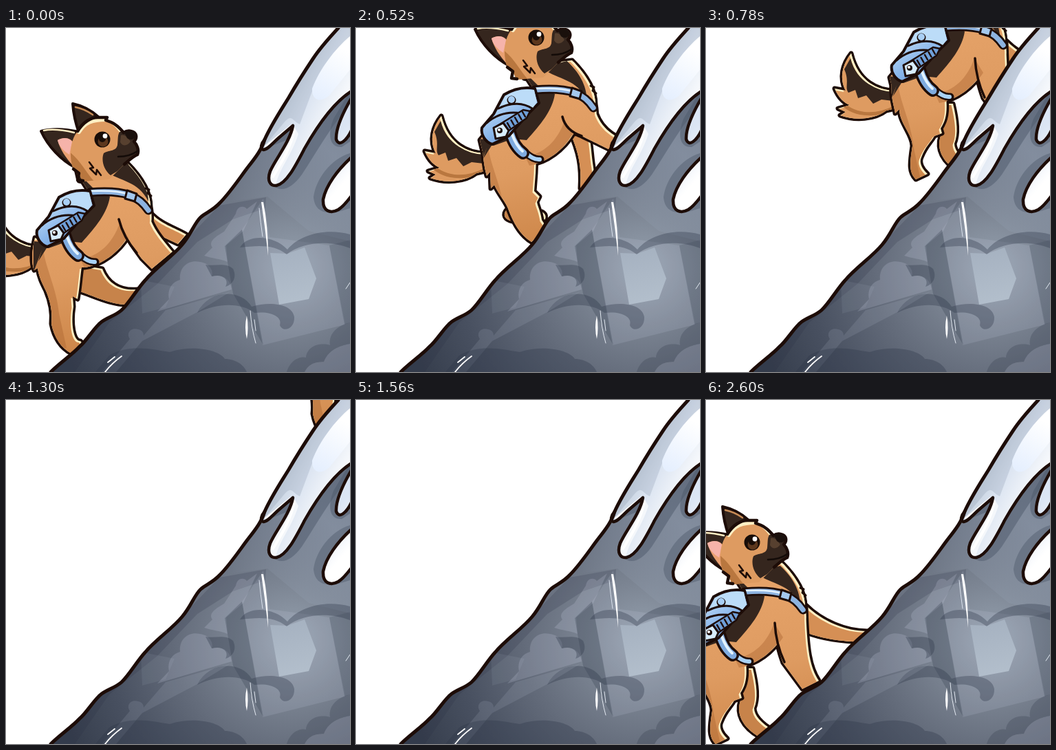
Write an HTML page with a canvas that moves like this. It is 500x500 px and loops after 2860 ms.

```html
<!DOCTYPE html>
<html lang="en">
<head>
<meta charset="utf-8">
<title>Climbing dog</title>
<style>
html, body { margin: 0; width: 100%; height: 100%; overflow: hidden; background: #fff; }
canvas { display: block; width: 500px; height: 500px; }
</style>
</head>
<body>
<canvas id="stage" width="500" height="500"></canvas>
<script>
const INK = '#1d0c07', CREAM = '#fff0c4', DARK = '#35261e', FUR = '#de9b61', SHADE = '#b9773f';
const STEP = 260, LOOP = 2860;
const stage = document.getElementById('stage').getContext('2d');
let ctx = stage;

const P = d => new Path2D(d);

function fill(d, style) {
  ctx.fillStyle = style;
  ctx.fill(P(d));
}

function line(d, width = 4.5, style = INK) {
  ctx.lineWidth = width;
  ctx.strokeStyle = style;
  ctx.lineJoin = ctx.lineCap = 'round';
  ctx.stroke(P(d));
}

function shape(d, style, width = 4) {
  fill(d, style);
  line(d, width);
}

function dot(x, y, r, style) {
  ctx.fillStyle = style;
  ctx.beginPath();
  ctx.arc(x, y, r, 0, 7);
  ctx.fill();
}

function within(d, draw) {
  ctx.save();
  ctx.clip(P(d));
  draw();
  ctx.restore();
}

function shifted(x, y, draw) {
  ctx.save();
  ctx.translate(x, y);
  draw();
  ctx.restore();
}

function linear(x0, y0, x1, y1, ...colors) {
  const g = ctx.createLinearGradient(x0, y0, x1, y1);
  colors.forEach((c, i) => g.addColorStop(i / (colors.length - 1), c));
  return g;
}

// One silhouette from several overlapping parts, with a rim light at the upper right
function furry(parts, style, details) {
  const d = parts.join(' ');
  line(d, 7);
  fill(d, CREAM);
  within(d, () => {
    shifted(-2.5, 2, () => fill(d, style));
    if (details) details();
  });
}

const TORSO = 'M102 205L106 222L111 223L122 240C98 256 62 286 42 312L50 345L114 348C140 345 165 325 178 303L205 300C214 285 212 270 210 260C210 240 198 218 176 196Z';
const TAIL = 'M-14 277C-26 292 -32 312 -22 331L-38 328C-32 342 -24 349 -16 352L-33 357L-22 362L-30 367C-8 375 20 373 37 360L54 356L50 331C25 331 -4 318 -14 277Z';
const FACE = 'M104 150C112 137 124 129 135 130L147 130L145 134L153 137C160 140 166 146 171 152C177 148 187 149 189 156C190 160 188 163 186 165C190 169 194 177 191 184C184 187 178 193 172 198';
const HEAD = FACE + 'L150 220L111 223L106 211L98 205C92 190 92 165 104 150Z';

const poses = {
  stand: {
    tail: -13,
    hind: 'M42 305C36 330 38 345 41 352L46 349C48 362 52 370 58 382C64 396 68 412 66 430C70 450 80 465 95 473L115 462L108 455C98 455 94 430 98 405L97 390L104 394C108 372 108 355 112 335Z',
    farHind: 'M110 345L104 382C125 388 150 402 176 402L192 380C170 382 150 375 140 350Z',
    arm: 'M163 270C170 300 185 318 197 335L212 350L242 325C225 305 213 290 208 272Z',
    farArm: 'M200 275L216 298L250 314L262 300C245 290 225 285 210 268Z',
    crease: 'M164 278C169 298 178 313 190 327'
  },
  reach: {
    tail: 0,
    hind: 'M46 310C46 335 48 350 52 364L57 358L58 382L63 377C70 392 80 402 84 414C90 430 100 450 117 460L140 440L132 428C130 414 126 408 125 402L129 394L121 386L123 360L124 335Z',
    farHind: 'M82 412C74 420 78 428 90 430L128 432C140 430 140 420 132 416Z',
    arm: 'M163 268C165 290 178 302 190 306C205 313 222 322 252 336L264 318C232 305 215 292 208 262Z',
    farArm: 'M172 298C186 330 190 350 188 382L212 385L206 345C204 330 204 320 200 300Z',
    crease: 'M162 278C166 294 178 302 190 306'
  },
  stride: {
    tail: 0,
    hind: 'M46 310C42 340 48 350 50 364L56 358C56 378 76 396 75 412C71 438 70 450 80 460L97 452C90 446 84 436 88 428C94 412 102 406 107 397L118 393L116 386C124 374 126 362 124 340Z',
    farHind: 'M112 350L116 397C110 416 118 435 144 450L164 440C146 430 136 418 136 408C142 394 140 375 134 350Z',
    arm: 'M165 275C167 310 173 328 178 342L206 380L230 368C217 348 213 325 211 262Z',
    farArm: 'M205 265L212 298C235 307 260 311 298 312L300 296C270 296 235 282 211 258Z',
    crease: 'M166 284C167 305 173 326 180 341'
  }
};

// Per step: body x, body y, head x, head y, pose; empty steps show the bare slope
const steps = [
  [0, 0, 0, 0, 'stand'],
  [68, -75, -8, 0, 'stride'],
  [138, -149, -16, 1, 'reach'],
  [225, -240, -8, 3, 'stride'],
  [309, -335, -7, 5, 'stride'],
  [380, -410, 0, 0, 'stand'],
  null, null, null,
  [-135, 110, -14, -1, 'reach'],
  [-66, 40, -7, 5, 'stride']
];

function drawPack() {
  const blue = linear(60, 250, 110, 320, '#c5e0f8', '#8ab6ea', '#5f8fcf');
  const strap = 'M122 239C145 237 165 238 180 243C193 248 201 256 207 265';
  line(strap, 13);
  line(strap, 7.5, '#8db3e0');
  line('M125 237C148 236 165 237 179 242', 2.5, '#e3f2ff');
  shape('M176 236L190 241L187 252L173 248Z', '#a4c8ee', 3);
  line('M108 330Q120 341 130 340', 11);
  line('M108 330Q120 341 129 340', 6, '#a9d2f6');
  line('M86 301Q92 322 105 331', 18);
  line('M86 301Q92 322 105 331', 11, '#7fabdf');
  line('M89 304Q95 320 104 328', 4, '#e3f3ff');
  shape('M122 237C106 234 90 238 77 246L62 274L45 294C43 304 50 315 60 318L84 306L112 274L128 258Z', blue);
  fill('M121 239C106 237 93 240 80 248L69 268C88 257 106 258 119 265L125 257Z', '#bcdcf8');
  line('M69 266C88 256 106 258 118 266', 3);
  line('M52 287C66 275 84 270 102 273', 3);
  shape('M66 292L105 268L115 270L110 280L80 301Z', '#6f9fd8', 2.5);
  for (let i = 0; i < 5; i++) line(`M${82 + i * 5.5} ${287 - i * 4}l4 7`, 2.5);
  shape('M62 294L76 287L84 298L80 307L65 310Z', '#d7ecfd', 3);
  dot(71, 298, 4, INK);
  dot(70, 297, 2, '#fff');
  dot(88, 254, 6.5, INK);
  dot(88, 253, 5, '#a9cff5');
}

function drawHead() {
  shape('M51 150C70 145 88 147 106 151L101 203C80 192 61 172 51 150Z', DARK);
  line('M55 149C70 146 86 149 99 152', 2.5, CREAM);
  fill('M75 163C86 157 94 161 99 167L97 200C88 190 78 176 75 163Z', '#e9a071');
  fill('M75 163C86 157 94 161 96 166L92 184C84 179 77 172 75 163Z', '#f6b3aa');
  shape('M106 152C101 138 98 124 97 110C111 113 123 119 134 129L128 140Z', DARK);
  line('M101 115C111 117 119 121 126 126', 2.5, '#c78b55');
  fill(HEAD, FUR);
  within(HEAD, () => {
    line('M106 151C114 138 124 132 150 133C160 140 166 147 170 154', 6, CREAM);
    fill('M92 180C108 192 116 210 130 225L96 225Z', SHADE);
    fill('M165 151C172 148 180 154 195 156L195 186L172 202L152 214C142 206 138 192 142 182C149 177 160 180 162 170C163 162 162 156 165 151Z', DARK);
    fill('M167 156C173 154 177 160 181 165C177 171 170 173 166 166Z', '#57402f');
  });
  line(FACE);
  line('M98 205L106 211L104 221L112 222');
  line('M163 187C174 187 184 184 191 179', 2.5, '#130b08');
  fill('M172 152C178 147 188 149 189 156C187 162 181 164 176 160Z', '#1a100c');
  dot(140, 162, 11.5, '#180d08');
  dot(141, 165, 7.5, '#5c371d');
  dot(140, 161, 5, '#180d08');
  dot(144, 157, 3.4, '#fff');
  line('M121 195L127 203L122 204L131 213L132 206L138 214', 2.5);
}

function drawDog([x, y, headX, headY, name]) {
  const pose = poses[name];
  const coat = linear(60, 250, 110, 470, '#e5a268', FUR, '#cd8649');
  shifted(x, y, () => {
    furry([pose.farHind], '#c7834a');
    furry([pose.farArm], '#d58f55');
    shifted(0, pose.tail, () => furry([TAIL], FUR, () => {
      fill('M-24 300C-16 318 -24 326 -18 334L-8 330L-4 342L8 338L18 350L30 344L56 347L52 332C25 332 -6 320 -15 284Z', DARK);
      line('M-32 345C-12 368 20 370 48 356', 5, SHADE);
      line('M-14 277C-4 318 25 331 50 331', 4, CREAM);
    }));
    furry([TORSO, pose.hind, pose.arm], coat, () => {
      fill('M40 310L54 322C58 350 74 380 77 415L88 465L60 470L36 340Z', 'rgba(168,98,45,.4)');
      fill('M114 349C140 345 165 325 178 305L165 284C155 313 135 332 108 336Z', 'rgba(168,98,45,.4)');
      fill('M100 206L126 232L151 245C148 268 130 290 110 312L90 310L62 320L44 316Z', DARK);
      fill('M40 310L64 312L47 339L52 323L40 355Z', DARK);
      shifted(headX * .6, headY, () =>
        fill('M140 190C155 206 168 198 178 196C196 212 207 232 207 252C192 222 168 224 142 207Z', DARK));
      line('M211 260C211 240 199 218 180 198', 4, CREAM);
    });
    line(pose.crease, 3.5);
    line('M203 233L208 235L206 240L211 244', 3);
    drawPack();
    shifted(headX, headY, drawHead);
  });
}

const EDGE = 'M65 500C79 486 96 475 107 463C117 455 129 434 139 427C149 420 159 418 168 410C179 400 190 380 202 367C218 348 241 333 256 315C269 300 274 283 283 275C291 268 301 265 311 254C325 240 339 219 351 203C363 188 372 176 376 162C386 140 400 119 411 101C422 82 434 63 446 45C457 28 470 14 483 0';
const ROCK = EDGE + 'L500 0L500 500Z';
const DRIP = 'M376 162C371 168 369 175 374 177C380 177 388 167 396 160L417 142C413 165 392 190 384 208C379 222 384 230 393 229C408 226 421 200 434 175C454 140 478 107 502 92';
const SNOW = DRIP + 'L502 0L483 0' + 'C470 14 457 28 446 45C434 63 422 82 411 101C400 119 386 140 376 162Z';
const NOTCH = 'M502 102C488 126 479 148 480 162C484 173 495 164 502 149';
const LOBE = 'M502 188C482 206 465 229 461 249C460 267 472 270 483 264C491 259 496 252 502 244';

function drawRock() {
  const g = ctx.createRadialGradient(418, 350, 10, 410, 340, 350);
  [[0, '#939eac'], [.22, '#7b8492'], [.48, '#626a79'], [.75, '#485060'], [1, '#363e4d']]
    .forEach(([at, c]) => g.addColorStop(at, c));
  fill(ROCK, g);
  within(ROCK, () => {
    const light = 'rgba(205,210,228,.2)', dim = 'rgba(45,54,70,.34)';
    fill('M310 254L375 162L500 80L500 310L440 295L380 245Z', linear(350, 280, 460, 170, 'rgba(150,162,180,0)', 'rgba(150,162,180,.62)'));
    fill('M255 315L310 258L378 246L377 262L330 278L278 311L220 372L150 428L100 500L62 500Z', 'rgba(40,48,64,.2)');
    fill('M196 372L198 415L232 406L245 376L200 367Z', 'rgba(205,210,228,.08)');
    fill('M220 412L237 394C234 379 242 369 253 366C251 346 267 336 282 340C297 342 302 354 299 361C314 357 326 364 328 380Z', light);
    fill('M290 344C304 347 318 340 330 350C336 362 330 373 319 376C325 365 314 357 299 361Z', dim);
    fill('M288 331L300 319C294 311 303 304 317 296L334 270C336 258 346 258 350 263L365 252L345 295L320 316L322 340C310 335 300 335 288 331Z', light);
    fill('M318 317L343 293L374 461L330 386Z', 'rgba(45,54,70,.26)');
    fill('M343 293L374 248L383 304L470 316L493 431L373 461Z', 'rgba(200,208,225,.15)');
    fill('M470 316L500 308L500 428L492 431Z', 'rgba(45,54,70,.17)');
    fill('M384 327L409 328L434 319L451 364L440 394L397 402Z', linear(400, 320, 420, 402, '#a5b1c0', '#b3bfcc'));
    fill('M340 319C352 298 391 302 409 322C426 301 464 290 500 300L500 320C473 309 433 309 408 329C390 314 366 316 340 319Z', dim);
    fill('M278 414C294 380 341 378 357 405C384 397 416 401 419 420C420 438 402 443 398 432C402 420 386 411 361 414C344 400 310 398 278 414Z', dim);
    fill('M180 452C174 443 182 435 192 438C198 439 200 443 200 447L232 410L325 384L278 413L198 455L160 500L140 500Z', 'rgba(205,210,228,.12)');
    fill('M150 476C180 458 216 468 238 471C272 460 310 468 318 481C334 481 346 490 350 500L130 500Z', dim);
    fill('M408 500C414 480 430 477 436 479C437 464 454 456 471 461C468 442 486 431 500 428L500 500Z', 'rgba(45,54,70,.25)');
    fill('M434 500C442 484 456 486 462 485C470 465 490 461 500 459L500 500Z', light);
    // Cast shadow of the snow
    fill('M374 177L417 142C410 122 432 118 430 139L420 200C440 155 470 110 500 96L500 112C472 142 452 180 430 213C414 235 399 240 386 227L394 190L410 162L385 172Z', 'rgba(78,90,108,.5)');
    fill('M500 182C472 190 450 220 447 246C449 266 462 270 480 268L500 262Z', 'rgba(78,90,108,.45)');
    fill('M500 92L476 132C467 155 470 174 488 173L500 165Z', 'rgba(78,90,108,.5)');
  });
}

function drawSnow() {
  const ice = linear(395, 60, 500, 115, '#b0bdca', '#dbe4f1', '#ffffff');
  fill(SNOW, ice);
  within(SNOW, () => {
    fill('M482 0L500 0L500 50L445 92L427 140C416 136 416 122 402 140L372 176L375 150L430 62Z', 'rgba(145,160,178,.3)');
    fill('M500 12C478 30 455 61 445 88C444 106 458 109 470 98L502 58Z', linear(448, 100, 490, 30, '#e5effe', '#fff'));
    fill('M417 140L425 154C414 188 397 204 392 229L380 222Z', 'rgba(255,255,255,.65)');
    line('M378 172L414 143M388 216C400 196 413 176 419 148', 4, '#fff');
  });
  [NOTCH, LOBE].forEach(d => fill(d, linear(460, 180, 500, 215, '#dbe5f4', '#fff')));
  [DRIP, NOTCH, LOBE].forEach(d => line(d));
}

function drawSlope() {
  drawRock();
  drawSnow();
  line(EDGE, 5);
  fill('M371 253L374 253Q381 288 381 331Q377 292 371 253Z', '#fff');
  line('M368 262Q370 283 373 303', 1, '#dbe3ee');
  fill('M350 418Q353 436 350 452Q346 435 350 418Z', '#fff');
  line('M355 411Q357 438 363 458M361 424L363 440', 1, '#e4eaf2');
  line('M144 500Q154 487 168 477M148 486L158 478', 1.8, '#fff');
  line('M494 379L500 370', 1, '#e4eaf2');
}

const slope = document.createElement('canvas');
slope.width = slope.height = 500;
ctx = slope.getContext('2d');
drawSlope();
ctx = stage;

let shown = -1;
const start = performance.now();

function tick(now) {
  const step = Math.floor(Math.max(0, now - start) % LOOP / STEP);
  if (step !== shown) {
    shown = step;
    ctx.fillStyle = '#fff';
    ctx.fillRect(0, 0, 500, 500);
    if (steps[step]) drawDog(steps[step]);
    ctx.drawImage(slope, 0, 0);
  }
  requestAnimationFrame(tick);
}
tick(start);
</script>
</body>
</html>
```
